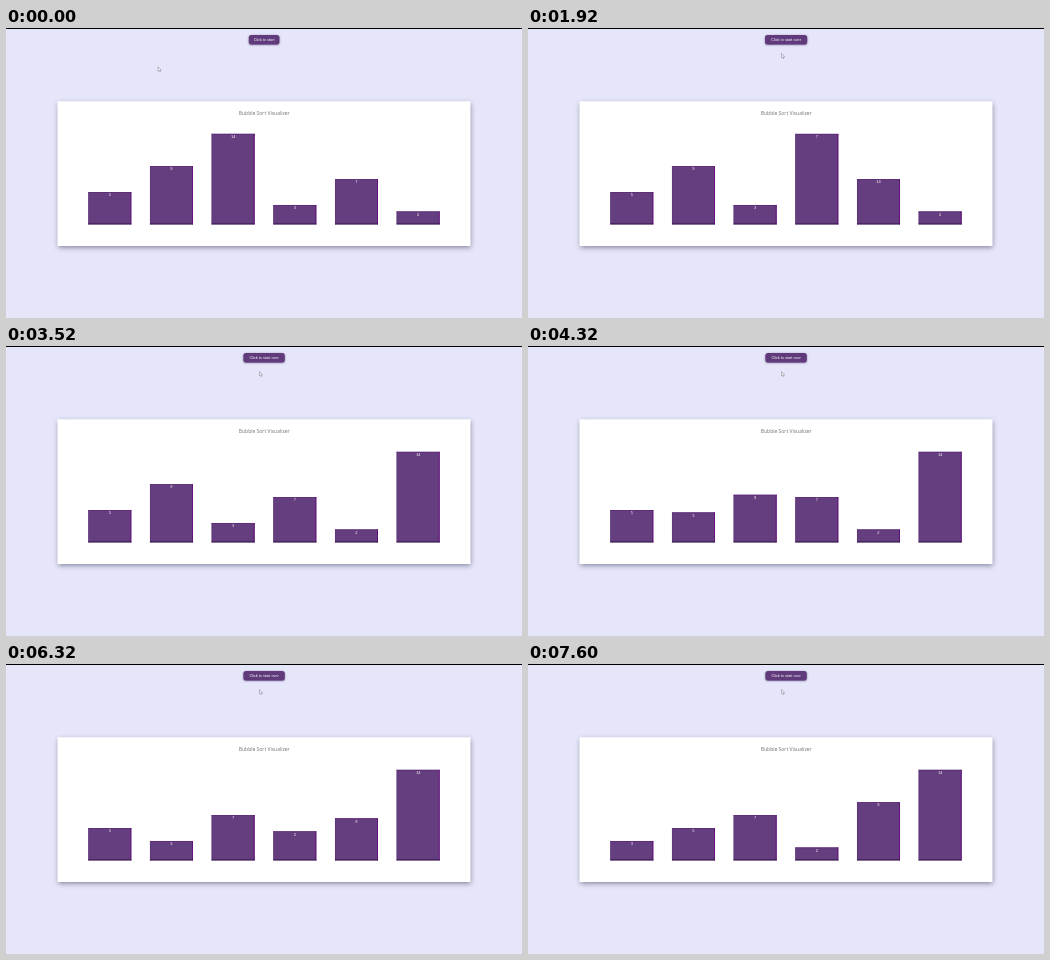
These frames come from a looping animation (516 by 290 pixels, 8 s). An HTML page with a canvas:

```html
<!DOCTYPE html>
<html lang="en">
<head>
<meta charset="utf-8">
<title>Bubble Sort Visualizer</title>
<style>
  html, body { margin: 0; width: 100%; height: 100%; overflow: hidden; background: #e6e6fa; }
  canvas { display: block; }
</style>
</head>
<body>
<canvas id="stage" width="516" height="290"></canvas>
<script>
const ctx = document.getElementById('stage').getContext('2d');

const LOOP = 8000, FRAME = 80;
const START_VALUES = [5, 9, 14, 3, 7, 2];
const CLICK = 889, SWAP_EVERY = 1016, SWAP_TIME = 600;
const BAR = { left: 82.3, step: 61.67, width: 43, bottom: 196.4, unit: 6.47 };
const REST = [152, 38.8], ON_BUTTON = [254, 13], AWAY = [253.5, 25.5];

// Every state of the list, one entry per swap.
const states = [START_VALUES];
for (let end = START_VALUES.length - 1; end > 0; end--) {
  for (let i = 0; i < end; i++) {
    const list = [...states.at(-1)];
    if (list[i] > list[i + 1]) {
      [list[i], list[i + 1]] = [list[i + 1], list[i]];
      states.push(list);
    }
  }
}

const mix = (a, b, k) => a + (b - a) * k;

// cubic-bezier(.42, 0, .58, 1), solved by bisection
function easeInOut(x) {
  if (x <= 0) return 0;
  if (x >= 1) return 1;
  let low = 0, high = 1, s;
  for (let i = 0; i < 20; i++) {
    s = (low + high) / 2;
    const at = 3 * s * (1 - s) * (0.42 * (1 - s) + 0.58 * s) + s ** 3;
    if (at < x) low = s; else high = s;
  }
  return s * s * (3 - 2 * s);
}

const progress = (t, from, to) => easeInOut((t - from) / (to - from));

function rect(color, x, y, w, h) {
  ctx.fillStyle = color;
  ctx.fillRect(x, y, w, h);
}

function text(string, x, y, font, color) {
  ctx.font = font;
  ctx.fillStyle = color;
  ctx.textAlign = 'center';
  ctx.fillText(string, x, y);
}

function withShadow(color, blur, offset, draw) {
  ctx.save();
  ctx.shadowColor = color;
  ctx.shadowBlur = blur;
  ctx.shadowOffsetY = offset;
  draw();
  ctx.restore();
}

function drawPage() {
  rect('#e6e6fa', 0, 0, 516, 290);
  rect('#000', 0, 0, 516, 1);
  withShadow('rgba(30,30,60,.5)', 5, 1.5, () => rect('#fff', 51.5, 73.3, 413, 144.7));
  text('Bubble Sort Visualizer', 258.2, 87.3, '5px "Open Sans", sans-serif', '#707070');
}

function drawBar(index, value, height) {
  const x = BAR.left + index * BAR.step, y = BAR.bottom - height, w = BAR.width;
  rect('#653e7f', x, y, w, height);
  rect('#5c2a78', x, y, w, 0.8);
  rect('#5c3478', x, y, 0.6, height);
  rect('#640c7c', x + w - 0.9, y, 0.9, height);
  rect('#36194a', x, BAR.bottom - 1, w, 1);
  text(value, x + w / 2, y + 4.3, '4px "Liberation Sans", Arial, sans-serif', '#fff');
}

function drawBars(t) {
  const swap = Math.floor((t - CLICK) / SWAP_EVERY);
  const now = states[Math.max(0, swap + 1)];
  const before = states[Math.max(0, swap)];
  const begin = CLICK + swap * SWAP_EVERY;
  const k = progress(t, begin, begin + SWAP_TIME);
  now.forEach((value, i) => drawBar(i, value, mix(before[i], value, k) * BAR.unit));
}

function drawButton(t) {
  const started = t >= CLICK;
  const scale = 1 + 0.11 * (progress(t, 320, 560) - progress(t, 1720, 2000));
  const width = started ? 41.4 : 30.6;
  ctx.save();
  ctx.translate(258.1, 11.7);
  ctx.scale(scale, scale);
  withShadow('rgba(40,20,70,.55)', 2, 0.6, () => {
    ctx.fillStyle = '#613a7c';
    ctx.beginPath();
    ctx.roundRect(-width / 2, -4.7, width, 9.4, 2.6);
    ctx.fill();
  });
  text(started ? 'Click to start over' : 'Click to start', 0, 1.2,
    '3.8px "Liberation Sans", Arial, sans-serif', '#fff');
  ctx.restore();
}

function drawCursor(t) {
  const arrive = progress(t, 0, 440), leave = progress(t, 1600, 1920);
  const [x, y] = REST.map((from, i) =>
    mix(mix(from, ON_BUTTON[i], arrive), AWAY[i], leave));
  const arrow = new Path2D('M0 0V4.4L1 3.5 1.8 5 2.5 4.7 1.8 3.3H3.1Z');
  const hand = new Path2D('M.3 0H1.1V1.7L3 2.2V3.7L2.4 5H.7L-.7 3 .3 3Z');
  ctx.save();
  ctx.translate(x, y);
  ctx.fillStyle = '#fff';
  ctx.strokeStyle = '#77778a';
  ctx.lineWidth = 0.5;
  const shape = Math.abs(x - 258) < 21 && y < 17 ? hand : arrow;
  ctx.fill(shape);
  ctx.stroke(shape);
  ctx.restore();
}

function render(now) {
  const t = Math.floor((now % LOOP) / FRAME) * FRAME;
  drawPage();
  drawBars(t);
  drawButton(t);
  drawCursor(t);
}

const origin = performance.now();
function tick() {
  render(performance.now() - origin);
  requestAnimationFrame(tick);
}
tick();
</script>
</body>
</html>
```
